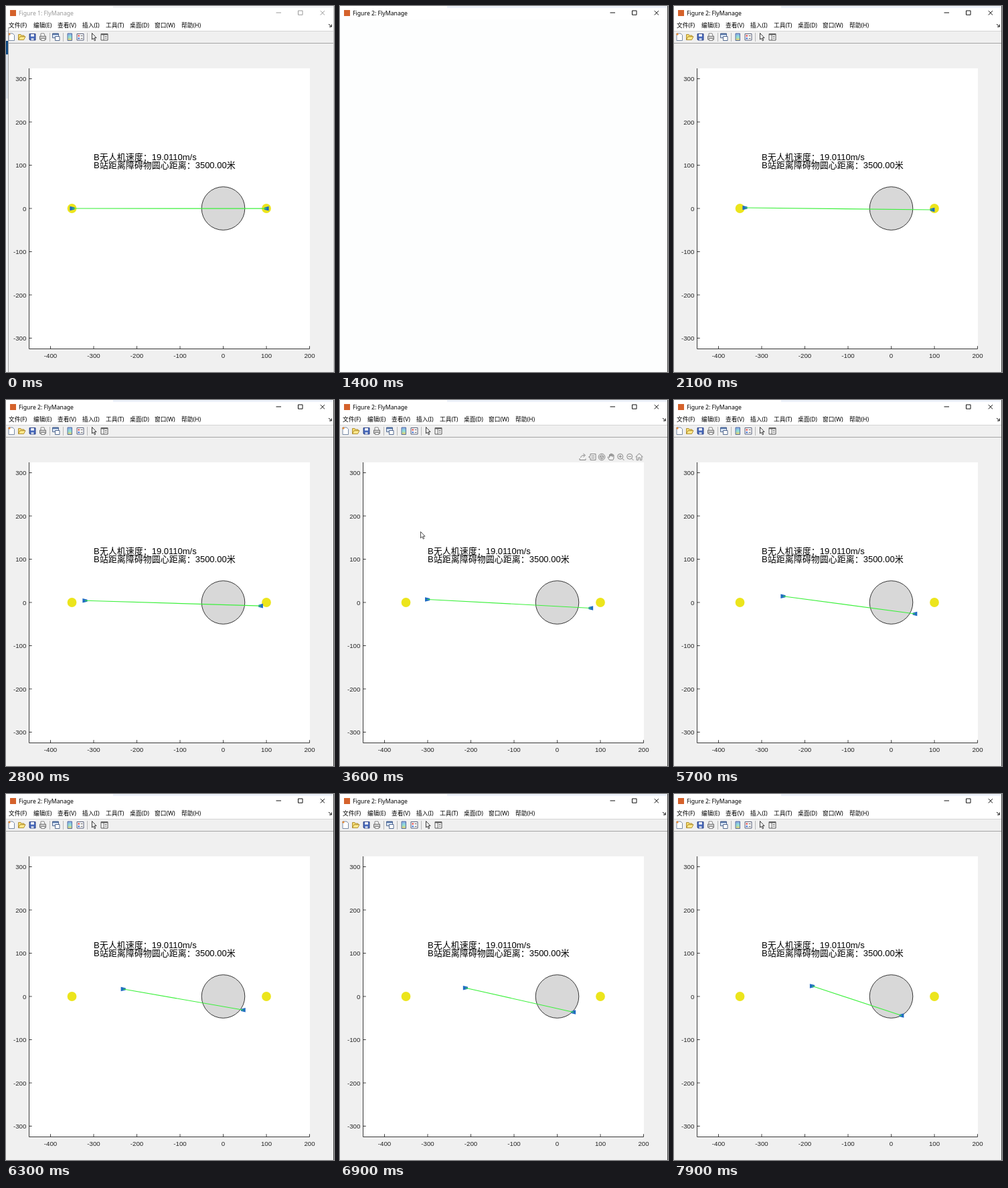
An HTML page for the animation above (8 s loop, 490 by 546 pixels).

```html
<!DOCTYPE html>
<html lang="zh-CN">
<head>
<meta charset="utf-8">
<title>FlyManage</title>
<style>
html, body { margin: 0; width: 490px; height: 546px; overflow: hidden; background: #fff; }
svg { display: block; }
.ui { font: 8.7px "Noto Sans", "Noto Sans CJK SC", sans-serif; }
.tick { font: 9.7px "Liberation Sans", sans-serif; fill: #262626; }
.info { font: 300 13px "Liberation Sans", "Noto Sans CJK SC", sans-serif; fill: #000; }
</style>
</head>
<body>
<svg width="490" height="546" viewBox="0 0 490 546">
  <rect width="490" height="546" fill="#fdfefe"/>
  <rect width="490" height="20" fill="#fff"/>
  <rect id="strip" x="160" width="330" height="3" fill="#edf2fa"/>
  <rect x="6" y="6" width="9" height="9" fill="#d5622b"/>
  <text id="title" class="ui" x="19" y="13.5"></text>
  <path id="buttons" d="M403.5 10H411M436.5 7H443V13.2H436.5ZM469.7 7.2L476 13.4M476 7.2L469.7 13.4" fill="none" stroke-width="1"/>

  <g id="chrome">
    <rect y="20" width="490" height="17" fill="#fff"/>
    <rect y="37" width="490" height="509" fill="#f0f0f0"/>
    <path d="M0 37.5H490" stroke="#d5d5d5"/>
    <path d="M0 55.5H490" stroke="#a5a5a5"/>
    <g id="menu" class="ui"></g>
    <path d="M482 27L486 30.5M486.3 27.5V31H483" fill="none" stroke="#111"/>
    <path d="M65.5 40V53M85.5 40V53M121.5 40V53" stroke="#b8b8b8"/>
    <g id="tools" stroke-width=".9">
      <path d="M4 41H10L12.5 43.5V51.5H4Z" fill="#fff" stroke="#6b7f9c"/>
      <circle cx="5" cy="42" r="1.6" fill="#e58a35"/>
      <path d="M18.5 50.5V42.5H22L23 44H27V46" fill="#f5dd70" stroke="#a98525"/>
      <path d="M18.5 50.5L21 45.7H29L26.5 50.5Z" fill="#ffe98c" stroke="#a98525"/>
      <path d="M35 41.5H44V51H36L35 50Z" fill="#4668ba" stroke="#263c80"/>
      <path d="M37 42H42V45.5H37Z" fill="#fff"/>
      <path d="M37.5 48H41.5V51H37.5Z" fill="#c8d1e5"/>
      <path d="M52 45V41H57L58 45" fill="#fff" stroke="#777"/>
      <path d="M50.5 45H59.5V50H50.5Z" fill="#c9c9c9" stroke="#666"/>
      <path d="M52.5 48.5H58V51.5H52.5Z" fill="#fff" stroke="#777"/>
      <path d="M69.5 41H78.5V47.5H69.5Z" fill="#d5e2f3" stroke="#455c85"/>
      <path d="M69.5 42H78.5" stroke="#355995" stroke-width="1.6"/>
      <path d="M73.5 45.5H80V51.5H73.5Z" fill="#fff" stroke="#455c85"/>
      <path d="M92 41H98.5V51.5H92Z" fill="url(#spectrum)" stroke="#46619b"/>
      <path d="M106 41.5H116V51H106Z" fill="#fff" stroke="#46506b"/>
      <path d="M107.5 44.5H110" stroke="#d33" stroke-width="2"/>
      <path d="M107.5 48.3H110" stroke="#36c" stroke-width="2"/>
      <path d="M111.5 44.5H114.5M111.5 48.3H114.5" stroke="#444"/>
      <path d="M128.5 40.5V50L130.7 48L132.3 51.8L133.8 51L132.2 47.5H135Z" fill="#fff" stroke="#222"/>
      <path d="M142 41.5H152V51H142Z" fill="#fff" stroke="#454545"/>
      <path d="M142 42.5H152" stroke="#666" stroke-width="1.8"/>
      <path d="M146 43V51M147.5 45.5H150.5M147.5 48H150.5" stroke="#555"/>
    </g>
  </g>

  <g id="plot">
    <rect x="34" y="93" width="420" height="419" fill="#fff"/>
    <g id="axes" stroke="#262626" stroke-width=".9"></g>
    <g id="ticks" class="tick"></g>
    <circle cx="324.5" cy="302" r="32.3" fill="#d8d8d8" stroke="#222" stroke-width=".9"/>
    <text class="info" x="131" y="230">B无人机速度：19.0110m/s</text>
    <text class="info" x="131" y="242.4">B站距离障碍物圆心距离：3500.00米</text>
    <circle cx="98.5" cy="302" r="6.9" fill="#ece51c"/>
    <circle cx="389" cy="302" r="6.9" fill="#ece51c"/>
    <path id="left" d="M-3.6 -3.3L3.6 -1.5V1.5L-3.6 3.3Z" fill="#1f6cc2"/>
    <path id="right" d="M3.4 -3.3L-3.4 -1.5V1.5L3.4 3.3Z" fill="#1f6cc2"/>
    <line id="link" stroke="#3cf03c" stroke-width="1.1"/>
  </g>

  <g id="hover" fill="none" stroke="#858585" stroke-width="1">
    <path d="M358 87V89.5H367V87.5M359.5 86C360 83.5 362 82.5 365 82.5M363.5 80L366.5 82.5L363.5 85"/>
    <path d="M374 80.5H382V89.5H374V86.5L371.5 85L374 83.5ZM375.5 83.5H380M375.5 86.5H380"/>
    <circle cx="391" cy="85" r="4.8"/>
    <path d="M388.5 83.5L391 82L393.5 83.5V86.7L391 88L388.5 86.7ZM388.5 83.5L391 85L393.5 83.5M391 85V88"/>
    <path d="M402.5 89.5L400 85.5L401.2 84.7L402.5 86V81.5H404V84V80.3H405.7V84V80.8H407.4V84.5V82H409V87L407.7 89.7Z"/>
    <path d="M421.8 87.3L424.5 90M435.8 87.3L438.5 90M416.5 84.3H421M418.7 82V86.5M430.5 84.3H435"/>
    <circle cx="418.7" cy="84.3" r="4"/>
    <circle cx="432.7" cy="84.3" r="4"/>
    <path d="M441.5 85L447 79.8L452.5 85M443.2 84V89.7H445.7V86H448.3V89.7H450.8V84"/>
  </g>
  <path id="cursor" d="M0 0V9.5L2.2 7.4L3.8 10.8L5.2 10.1L3.7 6.8H6.5Z" fill="#fff" stroke="#222" stroke-width=".8"/>

  <g id="behind">
    <rect y="38" width="3.5" height="508" fill="#f4f5f7"/>
    <rect y="52" width="3" height="20.5" fill="#0e4a82"/>
    <rect y="72.5" width="3" height="65.5" fill="#dfe4ec"/>
    <path d="M3.5 32V546" stroke="#a0a0a0"/>
  </g>
  <path id="edge" d="M489.5 0V546"/>
  <defs>
    <linearGradient id="spectrum" x2="0" y2="1">
      <stop stop-color="#8ba7e8"/><stop offset=".5" stop-color="#8fe0d8"/><stop offset="1" stop-color="#f2cf66"/>
    </linearGradient>
  </defs>
</svg>
<script>
const LOOP = 8000;
const OPEN = 1400, MENU = 1500, PLOT = 1600;
const HOVER = [3300, 5000], POINTER = [3200, 5100];

// [time, progress] of the flight
const flight = [[1700, -.07], [2100, 0], [3100, .17], [3600, .245], [4000, .29],
  [4900, .42], [5700, .567], [6900, .81], [7900, 1], [8000, 1.02]];
// [time, x, y] of the mouse
const mouse = [[3200, 80, 175], [3600, 120.5, 196.5], [4100, 205, 182],
  [4500, 288, 154], [4800, 415, 68], [5100, 450, 2]];

const $ = id => document.getElementById(id);
const px = x => 324.5 + x * .645;
const py = y => 302 - y * .645;

function along(keys, t) {
  if (t <= keys[0][0]) return keys[0].slice(1);
  for (let i = 1; i < keys.length; i++) {
    const a = keys[i - 1], b = keys[i];
    if (t <= b[0]) {
      const k = (t - a[0]) / (b[0] - a[0]);
      return a.slice(1).map((v, j) => v + (b[j + 1] - v) * k);
    }
  }
  return keys[keys.length - 1].slice(1);
}

function set(el, attrs) {
  for (const k in attrs) el.setAttribute(k, attrs[k]);
}

function add(parent, tag, attrs, text = '') {
  const el = document.createElementNS('http://www.w3.org/2000/svg', tag);
  set(el, attrs);
  el.textContent = text;
  $(parent).append(el);
}

function build() {
  const names = ['文件(F)', '编辑(E)', '查看(V)', '插入(I)', '工具(T)', '桌面(D)', '窗口(W)', '帮助(H)'];
  const starts = [4, 41, 77, 114, 149, 185, 222, 262];
  names.forEach((s, i) => add('menu', 'text', { x: starts[i], y: 32 }, s));

  let d = 'M34.5 93V511.5H453.5';
  for (let x = -400; x <= 200; x += 100) {
    d += `M${px(x)} 511.5v-4.2`;
    add('ticks', 'text', { x: px(x), y: 525.3, 'text-anchor': 'middle' }, x);
  }
  for (let y = -300; y <= 300; y += 100) {
    d += `M34.5 ${py(y)}h4.2`;
    add('ticks', 'text', { x: 30.3, y: py(y) + 3.7, 'text-anchor': 'end' }, y);
  }
  add('axes', 'path', { d, fill: 'none' });
}

function show(id, on) {
  $(id).style.display = on ? '' : 'none';
}

function draw(t) {
  const first = t < OPEN;
  const within = ([a, b]) => t >= a && t < b;
  $('title').textContent = `Figure ${first ? 1 : 2}: FlyManage`;
  set($('title'), { fill: first ? '#999' : '#000' });
  set($('buttons'), { stroke: first ? '#999' : '#111' });
  set($('edge'), { stroke: first ? '#c8c8c8' : '#444' });
  set($('strip'), { fill: first ? '#f3f4f6' : '#edf2fa' });
  show('behind', first);
  show('chrome', first || t >= MENU);
  show('plot', first || t >= PLOT);
  show('hover', within(HOVER));
  show('cursor', within(POINTER));

  const [p] = along(flight, t);
  const x1 = 106 + 100.5 * p, y1 = 301 - 14.5 * p;
  const x2 = 386 - 46 * p, y2 = 304 + 26.5 * p;
  set($('left'), { transform: `translate(${x1} ${y1})` });
  set($('right'), { transform: `translate(${x2} ${y2})` });
  set($('link'), { x1, y1, x2, y2 });

  const [mx, my] = along(mouse, t);
  set($('cursor'), { transform: `translate(${mx} ${my})` });
}

build();
const start = performance.now();
function tick() {
  // the picture advances in steps of 100 ms
  draw(Math.floor((performance.now() - start) % LOOP / 100) * 100);
  requestAnimationFrame(tick);
}
tick();
</script>
</body>
</html>
```
